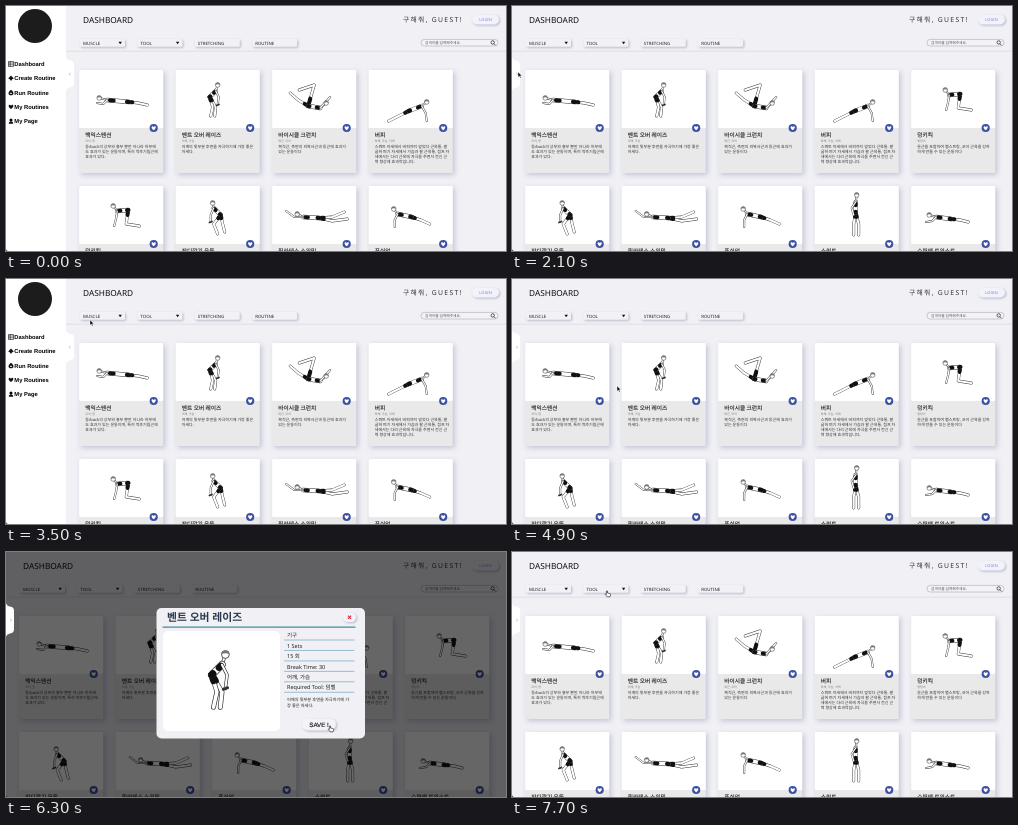
These frames come from a looping animation (500x245 px, 8000 ms). An HTML page:

```html
<!DOCTYPE html>
<html lang="ko">
<head>
<meta charset="utf-8">
<style>
html, body { margin: 0; width: 100%; height: 100%; overflow: hidden; background: #f0f0f5; }
svg { display: block; width: 500px; height: 245px; font-family: 'Noto Sans', 'Noto Sans CJK KR', sans-serif; text-rendering: geometricPrecision; }
.raised { filter: drop-shadow(1px 1.3px 1.3px rgba(110, 113, 145, .45)); }
.card { filter: drop-shadow(2px 2px 2.5px rgba(150, 155, 185, .5)); }
.arial { font-family: 'Liberation Sans', Arial, sans-serif; }
</style>
</head>
<body>
<svg id="stage" viewBox="0 0 500 245"></svg>
<script>
// Joints: head, shoulder, hip, elbow, hand, knee, foot, then optional second knee, foot, elbow, hand
const exercises = [
  { name: '백익스텐션', part: '코어, 등', pose: '20,28 28,30 50,32 24,34 18,33 59,33 68,35',
    text: ['등/back의 상부와 흉부 뿐만 아니라 하부에', '도 효과가 있는 운동이며, 특히 척추기립근에', '효과가 있다.'] },
  { name: '벤트 오버 레이즈', part: '어깨, 가슴', weights: true, pose: '42,15 40,21 34,27 43,27 42,35 37,37 35,46 40,37 39,46',
    text: ['어깨의 뒷부분 후면을 자극하기에 가장 좋은', '자세다.'] },
  { name: '바이시클 크런치', part: '복근, 코어', pose: '54,33 48,38 36,36 58,27 54,32 26,30 18,23 42,15 27,20',
    text: ['복직근, 측면의 외복사근과 등근에 효과가', '있는 운동이다'] },
  { name: '버피', part: '하체, 가슴, 어깨', pose: '58,32 53,36 40,41 57,43 58,51 30,46 20,51',
    text: ['스쿼트 자세에서 버피까지 엎었다 근육통, 팔', '굽혀 펴기 자세에서 가슴과 팔 근육통, 점프 자', '세에서는 다리 근육에 자극을 주면서 전신 근', '력 향상에 효과적입니다.'] },
  { name: '덩키킥', part: '엉덩이', pose: '34,20 38,25 49,24 37,32 35,40 47,38 60,40',
    text: ['둔근을 포함하여 햄스트링, 코어 근육을 강하', '하게 만들 수 있는 운동이다'] },
  { name: '잔디깎기 운동', weights: true, pose: '37,17 38,22 45,29 35,29 35,36 38,38 42,48 47,38 49,46' },
  { name: '필라테스 스위밍', pose: '25,28 31,31 47,32 22,31 14,25 60,31 72,26 60,35 75,33' },
  { name: '푸쉬업', pose: '25,23 29,28 43,31 26,34 26,41 52,34 61,38' },
  { name: '스쿼트', pose: '42,9 41,16 41,27 37,22 39,29 39,38 39,49 44,38 44,49' },
  { name: '슈퍼맨 트위스트', pose: '18,29 25,31 40,33 21,35 15,36 49,34 57,36' }
];
const lifted = '45,18 42,21 37,27 35,19 28,18 35,36 34,46 40,36 43,45 48,20 53,18';

const STEP = 700, LOOP = 8000;
const scenes = [
  { open: true },
  { open: true },
  { open: true, arrow: [64, 67] },
  { arrow: [6, 66] },
  { open: true, arrow: [30, 66] },
  { open: true, arrow: [84, 41] },
  { arrow: [50, 90] },
  { arrow: [105, 107] },
  { arrow: [190, 110], modal: lifted },
  { hand: [324, 174], modal: exercises[1].pose },
  { arrow: [342, 65] },
  { hand: [95, 39] }
];

const text = (x, y, size, s, extra = '') =>
  `<text x="${x}" y="${y + size * .36}" font-size="${size}" ${extra}>${s}</text>`;
const box = (x, y, w, h, r, fill, extra = '') =>
  `<rect x="${x}" y="${y}" width="${w}" height="${h}" rx="${r}" fill="${fill}" ${extra}/>`;
const path = (d, fill = '#111', extra = '') => `<path d="${d}" fill="${fill}" ${extra}/>`;
const line = (pts, w, color) =>
  path('M' + pts.join('L'), 'none', `stroke="${color}" stroke-width="${w}" stroke-linecap="round" stroke-linejoin="round"`);
const at = (x, y, s, scale = 1) => `<g transform="translate(${x} ${y}) scale(${scale})">${s}</g>`;
const heart = fill => path('M0 2.2C-4.2-.5-1.8-3.6 0-1.2C1.8-3.6 4.2-.5 0 2.2Z', fill);
const mix = (a, b, k) => a.map((v, i) => v + (b[i] - v) * k);

function figure(pose, weights) {
  const [head, shoulder, hip, elbow, hand, knee, foot, knee2, foot2, elbow2, hand2] =
    pose.split(' ').map(p => p.split(',').map(Number));
  const limb = (w, ...pts) => line(pts, w, '#333') + line(pts, w - .8, '#fff');
  const leg = (k, f) => limb(2.9, hip, k, f) + line([hip, mix(hip, k, .35)], 4, '#111');
  const arm = (e, h) => limb(2, shoulder, e, h) +
    (weights ? line([[h[0] - 1.3, h[1] + .5], [h[0] + 1.3, h[1] - .5]], 1.7, '#333') : '');
  const [hx, hy] = head;
  return (knee2 ? leg(knee2, foot2) : '') + (hand2 ? arm(elbow2, hand2) : '') + leg(knee, foot) +
    limb(2, shoulder, head) + limb(4.4, shoulder, hip) +
    line([mix(shoulder, hip, .12), mix(shoulder, hip, .3)], 3.8, '#111') +
    line([mix(shoulder, hip, .9), hip], 4.2, '#111') +
    arm(elbow, hand) +
    `<circle cx="${hx}" cy="${hy}" r="2.3" fill="#fff" stroke="#333" stroke-width=".5"/>` +
    path(`M${hx - 2.4} ${hy}a2.4 2.4 0 0 1 4.8 0q-2.2-1.6-4.8 0z`, '#777');
}

function card(e, i, cols) {
  const body = box(0, 0, 84, 103, 1, '#e9e9ea', 'class="card"') + box(0, 0, 84, 58, 1, '#fff') +
    figure(e.pose, e.weights) +
    `<circle cx="74.5" cy="58" r="4.1" fill="#3c51a3"/>` + at(74.5, 58.2, heart('#fff'), .9) +
    text(6, 64.5, 5.7, e.name, 'font-weight="500" fill="#222" stroke="#222" stroke-width=".12"') +
    (e.part ? text(6, 70.6, 3, e.part, 'fill="#777"') : '') +
    (e.text || []).map((s, n) => text(6, 77 + n * 5, 4, s, 'fill="#333"')).join('');
  return at(13.2 + i % cols * 96.5, 64 + Math.floor(i / cols) * 116, body);
}

function filters() {
  return ['MUSCLE', 'TOOL', 'STRETCHING', 'ROUTINE'].map((s, i) => at(14 + i * 57.4, 33,
    box(0, 0, 45, 7.8, 1.5, '#f2f2f6', 'class="raised"') +
    text(3, 4, 4.4, s, 'font-weight="500" fill="#222"') +
    (i < 2 ? path('M38.5 2.8h3.4l-1.7 2.5z') : ''))).join('');
}

function header() {
  return text(397, 13.2, 6.8, '구해줘, GUEST!', 'font-weight="500" fill="#333" letter-spacing="1.3"') +
    box(466, 9, 27, 9.5, 4.7, '#f2f2fa', 'class="raised"') +
    text(479.5, 13.8, 4, 'LOGIN', 'fill="#8080e0" text-anchor="middle"') +
    box(415, 33.4, 77, 6.6, 3.3, '#f3f3f7', 'stroke="#aaaab4" stroke-width=".6"') +
    text(419, 36.7, 3.7, '검색어를 입력해주세요.', 'fill="#555"') +
    path('M488 37.8l1.6 1.6M488.4 36.4a1.7 1.7 0 1 1-3.4 0a1.7 1.7 0 1 1 3.4 0z', 'none', 'stroke="#222" stroke-width=".7"');
}

function sidebar() {
  const icons = [
    path('M-2.5-2.5h5v5h-5zM-2.5-1h5M-2.5 .8h5M-.8-2.5v5', 'none', 'stroke="#111" stroke-width=".6"'),
    path('M0-2.8L2.8 .2L1.2 1L0 2.6L-1.2 1L-2.8 .2Z'),
    path('M0-2.8C3.6 0 3 2.7 0 2.7S-3.6 0 0-2.8z') + path('M0-.4l1.1 1.8h-2.2z', '#fff'),
    heart('#111'),
    path('M-2.3 2.6q0-2.5 2.3-2.5t2.3 2.5z') + '<circle cy="-1.2" r="1.5"/>'
  ];
  const labels = ['Dashboard', 'Create Routine', 'Run Routine', 'My Routines', 'My Page'];
  return box(0, 0, 60, 245, 0, '#fff') + '<circle cx="29" cy="20" r="17" fill="#1c1c1c"/>' +
    labels.map((s, i) => at(5, 58 + i * 14.3, icons[i]) +
      text(8.3, 58 + i * 14.3, 5.8, s, 'class="arial" font-weight="700"')).join('');
}

function modal(pose) {
  const e = exercises[1];
  const rows = ['기구', '1 Sets', '15 회', 'Break Time: 30', e.part, 'Required Tool: 덤벨'];
  return box(0, 0, 500, 245, 0, '#000', 'opacity=".6"') +
    box(150.5, 56, 208.5, 130.5, 5, '#f0f0f5') +
    text(161, 65.5, 10.8, e.name, 'font-weight="700" fill="#2b3950"') +
    line([[157, 75.2], [349, 75.2]], 1.2, '#3f8fa0') +
    box(157, 79, 117, 100, 5, '#fff') + at(148, 77, figure(pose, true), 1.7) +
    rows.map((s, i) => text(281, 83.2 + i * 10.45, 5.5, s, 'font-weight="500" fill="#222"') +
      line([[278.5, 88 + i * 10.45], [348, 88 + i * 10.45]], .8, '#7fb0cc')).join('') +
    text(281, 147.2, 4.2, '어깨의 뒷부분 후면을 자극하기에 가', 'fill="#222"') +
    text(281, 153.8, 4.2, '장 좋은 자세다.', 'fill="#222"') +
    box(337, 60.5, 13, 9.6, 4.8, '#f3f3f8', 'class="raised"') +
    path('M341.9 63.7l3.2 3.2m0-3.2l-3.2 3.2', 'none', 'stroke="#e3243b" stroke-width="1.1"') +
    box(296, 166.5, 34, 12, 6, '#f3f3f8', 'class="raised"') +
    text(313, 172.6, 6.2, 'SAVE !', 'class="arial" fill="#111" stroke="#111" stroke-width=".15" text-anchor="middle"');
}

function tab(x, open) {
  return path(`M${x} 51.5q1 2.5 4 3q4 .7 4 4v19q0 3.3-4 4q-3 .5-4 3z`, '#fff') +
    path(`M${x + 4.4} 67l${open ? '-1.2 1.2 1.2 1.2' : '1.2 1.2-1.2 1.2'}`, 'none', 'stroke="#777" stroke-width=".5"');
}

const arrowShape = path('M0 0v5.3l1.3-1.2l.9 2l.9-.4l-.9-1.9h1.7z', '#111', 'stroke="#fff" stroke-width=".4"');
const handShape = path('M-.6 0q.6-.7 1.1 0v2l2.6.6q.7.2.5 1l-.6 2.2h-2.8l-2-2.5q.2-.8 1.2 0z', '#fff', 'stroke="#111" stroke-width=".6"');

function draw({ open, arrow, hand, modal: pose }) {
  const left = open ? 60 : 0, cols = open ? 4 : 5;
  return box(0, 0, 500, 245, 0, '#f0f0f5') +
    line([[left, 45.2], [500, 45.2]], .7, '#d6d6de') +
    at(left, 0, text(17, 14, 8.3, 'DASHBOARD', 'font-weight="500" fill="#111"') + filters() +
      exercises.slice(0, cols * 2).map((e, i) => card(e, i, cols)).join('')) +
    header() + (open ? sidebar() : '') + (pose ? modal(pose) : '') + tab(left, open) +
    (arrow ? at(...arrow, arrowShape) : '') + (hand ? at(...hand, handShape) : '') +
    path('M0 243v2h2q-1.6-.2-2-2z', '#333');
}

const stage = document.getElementById('stage');
let shown = -1;
function tick() {
  const n = Math.floor(performance.now() % LOOP / STEP);
  if (n !== shown) stage.innerHTML = draw(scenes[shown = n]);
  requestAnimationFrame(tick);
}
tick();
</script>
</body>
</html>
```
